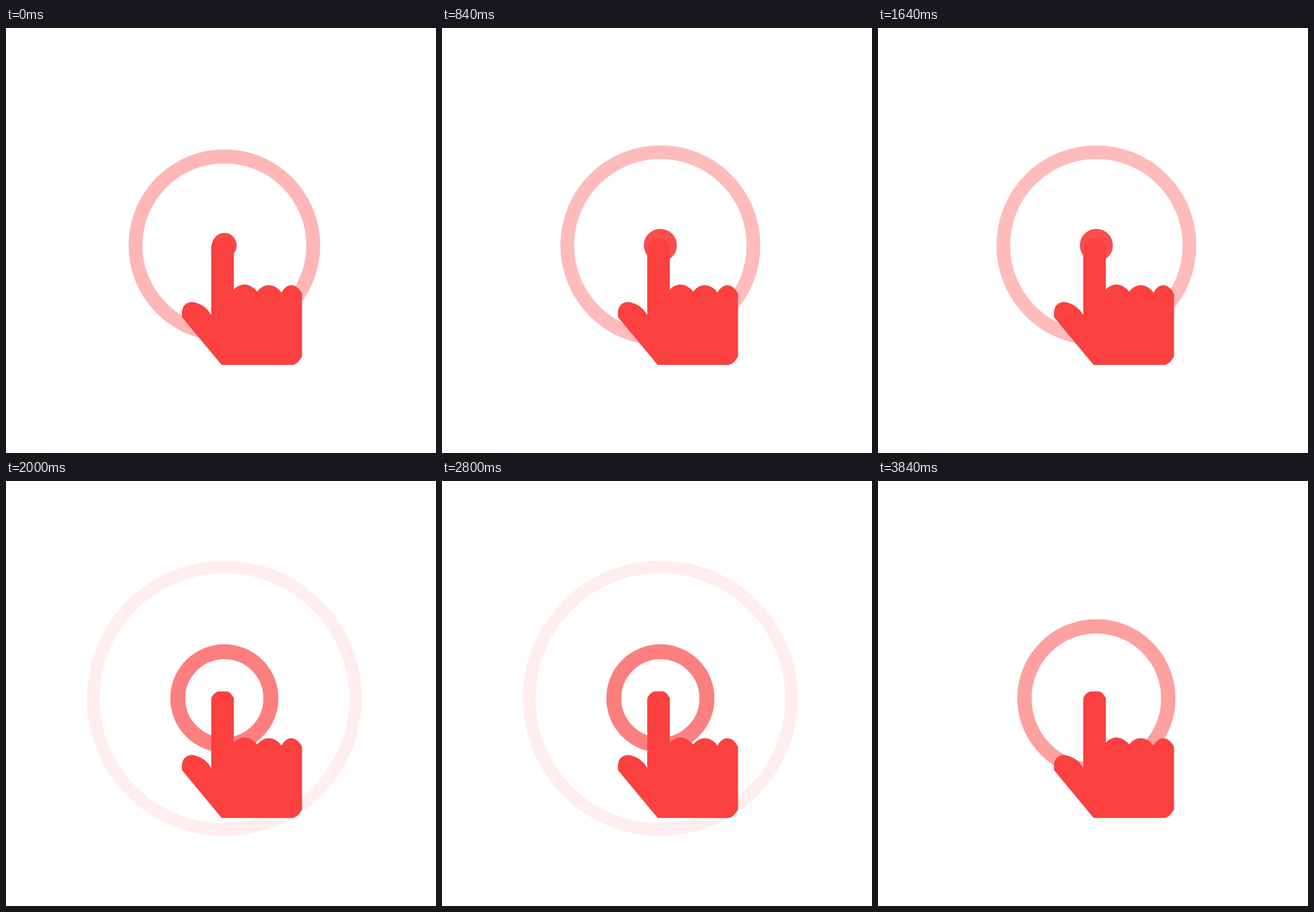
Animation, 640 px wide and 632 px high, one loop 3880 ms. Source, as an HTML page:

```html
<!DOCTYPE html>
<html lang="en">
<head>
<meta charset="utf-8">
<title>Tap</title>
<style>
html, body { margin: 0; width: 100%; height: 100%; overflow: hidden; background: #fff; }
svg { display: block; width: 100vw; height: 100vh; }
</style>
</head>
<body>
<svg viewBox="0 0 640 632">
  <g id="rings" fill="none" stroke="#fb4040">
    <circle cx="325" cy="323.2"/>
    <circle cx="325" cy="323.2"/>
  </g>
  <path fill="#fb4040" stroke="#b08070" stroke-opacity=".35" stroke-width=".8" d="M305.5 427V325Q305.5 321 309 317.500Q313 313 317 313H328Q332 313 335 317L339 322.500V389
    Q346 381.500 355 381.500Q366 382 374 392Q381 382.500 391 382.500Q402 382.500 410 393.500
    Q416 382.500 425 382.500Q434 383 440.500 395V489L436 495Q432 500 427 501H321
    L262 430V421Q264 408 277 407.500Q296 410 305.500 427Z"/>
</svg>
<script>
const LOOP = 3880, STEP = 40, BEAT = 800, LIFE = 1260;
const rings = [...document.querySelectorAll('#rings circle')];

// Each ring grows steadily while its stroke thins and fades.
function drawRing(ring, age) {
  const width = 24.1 - 0.0044 * age;
  const radius = 6.3 + 0.1575 * age;
  const alpha = 0.96 - 0.000725 * age;
  ring.setAttribute('r', radius);
  ring.setAttribute('stroke-width', width);
  ring.setAttribute('opacity', age < LIFE ? alpha : 0);
}

function draw(ms) {
  const t = Math.floor((ms % LOOP) / STEP) * STEP;
  rings.forEach((ring, i) => drawRing(ring, t % BEAT + i * BEAT));
}

const start = performance.now();
function tick() {
  draw(performance.now() - start);
  requestAnimationFrame(tick);
}
tick();
</script>
</body>
</html>
```
